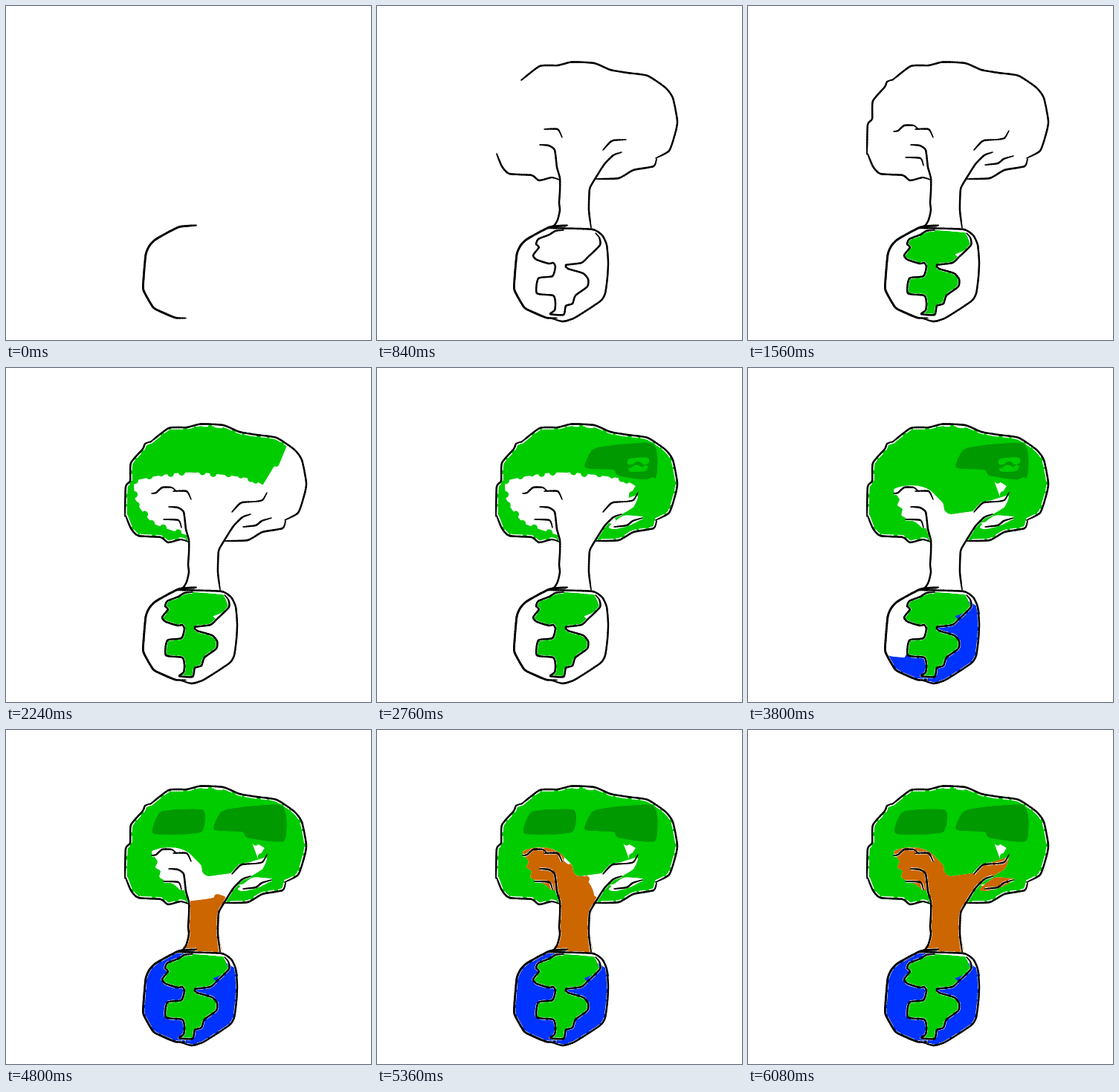
Animation of 491x450 px, one loop 8.2 s. Source, as an HTML page with a canvas:

```html
<!DOCTYPE html>
<html lang="en">
<head>
<meta charset="utf-8">
<title>Tree growing from a globe</title>
<style>
html, body { margin: 0; width: 100%; height: 100%; overflow: hidden; background: #fff; }
canvas { display: block; }
</style>
</head>
<body>
<canvas id="stage" width="491" height="450"></canvas>
<script>
const ctx = document.getElementById('stage').getContext('2d');
const LOOP = 8200, STEP = 40, TENSION = 0.3;
const GREEN = '#00cc00', DARK = '#009900', BLUE = '#0033ff', BROWN = '#cc6600';

const parse = text => text.trim().split(/\s+/).map(p => p.split(',').map(Number));
const reversed = text => text.trim().split(/\s+/).reverse().join(' ');

// Smooth curve through key points, sampled about every 3 pixels
function curve(text, closed = false) {
  const keys = parse(text), count = keys.length, out = [];
  const at = i => closed ? keys[(i + count) % count] : keys[Math.max(0, Math.min(count - 1, i))];
  for (let i = 0; i < count - (closed ? 0 : 1); i++) {
    const [a, b, c, d] = [at(i - 1), at(i), at(i + 1), at(i + 2)];
    const n = Math.ceil(Math.hypot(c[0] - b[0], c[1] - b[1]) / 3);
    for (let k = 0; k < n; k++) {
      const u = k / n, ease = u * u * (3 - 2 * u);
      const leave = u * (1 - u) ** 2 * TENSION, arrive = u * u * (u - 1) * TENSION;
      out.push([0, 1].map(j => b[j] + ease * (c[j] - b[j])
        + leave * (c[j] - a[j]) + arrive * (d[j] - b[j])));
    }
  }
  if (!closed) out.push(keys[count - 1]);
  return out;
}

function trace(points) {
  const path = new Path2D();
  points.forEach(([x, y], i) => i ? path.lineTo(x, y) : path.moveTo(x, y));
  return path;
}

// Outlines, shared by the pen lines and the painted areas
const globeLeft = `256,295.5 232,298 202,314 193,323 188,335 185,368 185,383 198,406 211,413
  228,420 242,420.5`;
const globeTop = '228,299 250,299.5 290,301 303,309';
const globeRight = '309,322 311,345 310,365 307,387 300,398 266,420 250,425 235,421';
const land = `251,302 240,303 232,308 217,314 214,321 218,325 210,336 215,342 231,347 237,346
  240,351 236,364 217,367 215,387 237,390 240,400 239,410 233,415 251,416 254,404 263,401
  267,390 283,378 284,368 277,360 257,354 254,349 275,346 284,338 300,322 299,312 294,306`;
const trunkLeft = '242,217 246,232 246,250 245,265 246,275 243,288 238,296';
const trunkRight = '329,197 318,201 306,213 292,235 286,247 285,275 288,299';
const crownTop = `194,100 219,81 243,80 262,75.5 292,77 314,86 337,90 364,94 388,110 398,124
  404,155 401,172 393,195 375,205`;
const crownRight = '376,206 372,216 345,221 325,232 294,233';
const crownBottom = '161,199 168,216 178,226 208,228 218,235 235,231 245,234';
const crownLeft = '195,99 187,102 184,109 168,128 167,152 161,160 160,200';

const crown = [crownTop, crownRight, reversed(crownBottom), reversed(crownLeft)].join(' ');
const sea = `${globeLeft} ${reversed(globeRight)}`;
const limbs = `${trunkLeft} ${reversed(trunkRight)} 345,187 350,172 318,182 306,192 272,197
  264,191 262,182 245,165 230,159 210,159 196,164 204,177 201,185 208,190 207,199 226,208 234,215`;
const twig = '312,214 332,199 358,201 342,211 320,217';
const darkRight = '280,134 290,110 318,104 369,101 377,119 373,150 325,145 318,137';
const darkLeft = '197,138 209,110 265,108 263,137 222,141';
const gap = '338,123 366,121 362,138 340,139';

// A brush follows a spine, swinging to both sides, inside a shape
function area(start, end, color, shape, spineKeys, reach) {
  const spine = curve(spineKeys);
  const swing = spine.map(([x, y], i) => {
    const [a, b] = [spine[Math.max(0, i - 1)], spine[Math.min(spine.length - 1, i + 1)]];
    const dx = b[0] - a[0], dy = b[1] - a[1];
    const side = reach * Math.sin(i * 1.1) / (Math.hypot(dx, dy) || 1);
    return [x - dy * side, y + dx * side];
  });
  return { start, end, color, shape: trace(curve(shape, true)), spine, swing, reach };
}
const blank = shape => area(0, 1, '#fff', shape, '150,200 380,200', 150);

const areas = [
  area(3200, 4120, BLUE, sea,
    '308,312 285,345 292,375 262,415 205,402 212,350 215,315 245,303', 30),
  area(1160, 1500, GREEN, land, '290,298 225,325 250,350 270,370 230,380 248,420', 30),
  area(1600, 2520, GREEN, crown, `238,256 180,235 145,190 145,130 215,112 265,110 340,120
    385,150 365,190 335,240 295,245`, 31),
  area(2780, 3200, GREEN, crown, '200,120 195,190 240,215 230,140 300,175 335,165', 34),
  blank(limbs),
  blank(twig),
  area(2320, 2740, DARK, darkRight, '376,145 365,122 330,125 275,128', 30),
  area(2500, 2560, GREEN, gap, '338,123 362,123', 3),
  area(2500, 2560, GREEN, gap, '338,139 362,137', 3),
  area(4080, 4280, DARK, darkRight, '380,125 275,125', 30),
  area(4280, 4480, DARK, darkLeft, '268,124 195,126', 24),
  area(4480, 5880, BROWN, limbs,
    '265,304 265,225 230,195 203,180 262,195 300,205 354,176', 27),
  area(5860, 6080, BROWN, twig, '308,212 362,204', 15)
];

// Pen lines drawn one after another, at a steady speed
function penRun(start, end, strokes) {
  const runs = strokes.map(([keys, halo = 1.2, width = 2.4]) => ({ line: curve(keys), halo, width }));
  const total = runs.reduce((sum, run) => sum + run.line.length, 0);
  let time = start;
  for (const run of runs) {
    run.start = time;
    run.end = time += (end - start) * run.line.length / total;
  }
  return runs;
}

const lines = [
  ...penRun(-STEP, 0, [[globeLeft, 1.2, 2.8]]),
  ...penRun(0, 840, [
    [`${globeTop} ${globeRight}`],
    ['231,300 242,297 254,297', 0, 1.6],
    [land],
    [`219,187 231,188 239,194 ${trunkLeft} 228,299`],
    [trunkRight],
    ['225,166 243,166 249,177'],
    ['304,194 313,184 318,181 335,180'],
    [crownTop, 3],
    [crownRight, 3],
    [crownBottom, 3]
  ]),
  ...penRun(840, 1160, [
    [crownLeft, 3],
    ['196,169 202,168 210,161 223,161 229,166'],
    ['212,204 232,205 236,215'],
    ['335,180 345,178 351,168'],
    ['319,214 336,212 344,206 357,202']
  ])
];

const progress = (item, t) => Math.max(0, Math.min(1, (t - item.start) / (item.end - item.start)));
const part = (points, p) => points.slice(0, Math.max(2, Math.ceil(points.length * p)));

function strokeLine(points, width) {
  ctx.lineWidth = width;
  ctx.stroke(trace(points));
}

function drawArea(item, p) {
  ctx.save();
  ctx.clip(item.shape);
  ctx.strokeStyle = item.color;
  ctx.lineCap = 'butt';
  strokeLine(part(item.spine, p), 2 * item.reach);
  ctx.lineCap = 'round';
  strokeLine(part(item.swing, p), 9);
  ctx.restore();
}

// Patchy white rim between a line and the paint
function drawHalo({ line, halo, width }, p) {
  if (!halo) return;
  ctx.strokeStyle = '#fff';
  ctx.lineCap = 'butt';
  ctx.setLineDash([17, 5, 9, 3]);
  strokeLine(part(line, p), width + halo);
  ctx.setLineDash([]);
}

// Pen line, thinner at both ends
function drawInk({ line, width }, p) {
  const shown = part(line, p), last = line.length - 1;
  ctx.strokeStyle = '#000';
  ctx.lineCap = 'round';
  for (let i = 1; i < shown.length; i++) {
    const taper = Math.min(1, 0.6 + Math.min(i, last - i) / 12);
    strokeLine([shown[i - 1], shown[i]], width * taper);
  }
}

function draw(t) {
  ctx.fillStyle = '#fff';
  ctx.fillRect(0, 0, 491, 450);
  ctx.lineJoin = 'round';
  for (const [items, paint] of [[areas, drawArea], [lines, drawHalo], [lines, drawInk]]) {
    for (const item of items) {
      const p = progress(item, t);
      if (p > 0) paint(item, p);
    }
  }
}

const began = performance.now();
function tick() {
  const t = (performance.now() - began) % LOOP;
  draw(Math.floor(t / STEP) * STEP);
  requestAnimationFrame(tick);
}
tick();
</script>
</body>
</html>
```
